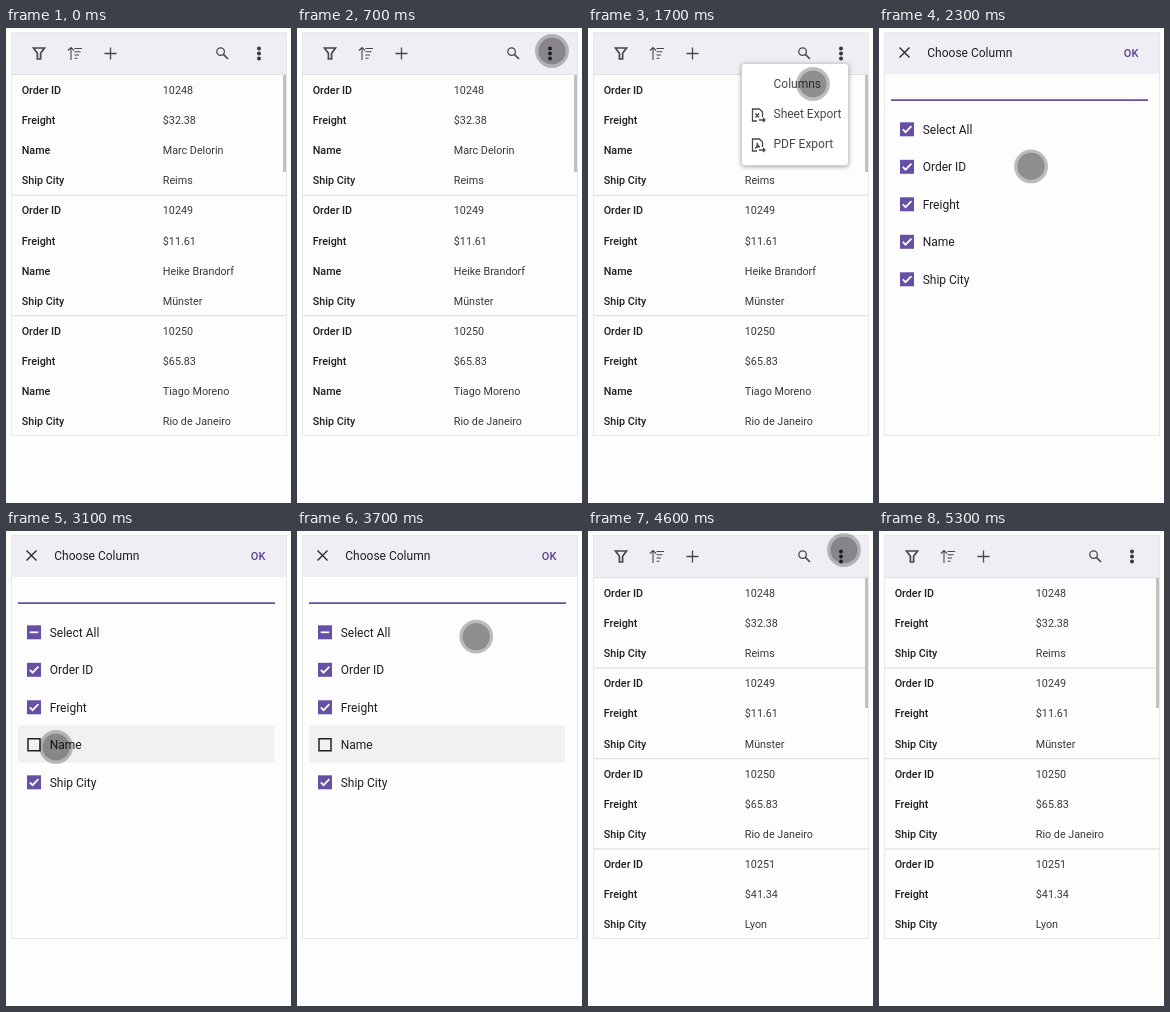
These frames come from a looping animation (285x475 px, 5.7 s). An HTML page:

```html
<!DOCTYPE html>
<html lang="en">
<head>
<meta charset="utf-8">
<title>Column chooser</title>
<style>
  html, body { margin: 0; width: 100%; height: 100%; overflow: hidden; background: #fefefe; }
  svg { display: block; width: 285px; height: 475px; font: 12px Roboto, sans-serif; fill: #1f1d23; }
  .cells { font-size: 10.75px; }
  .label { font-weight: 500; }
  .value { fill: #39363f; }
  .line { fill: none; stroke: #49454e; stroke-width: 1.3; }
  .menu { fill: #49454e; }
  .panel { fill: #fff; stroke: #d2d2d2; filter: drop-shadow(0 1px 2px #0005); }
  .tick { fill: none; stroke: #fff; stroke-width: 1.7; }
</style>
</head>
<body>
<svg viewBox="0 0 285 475">
  <rect x="5.5" y="4.5" width="275" height="403" fill="#fdfdfd" stroke="#e8e8e8"/>
  <path d="M6 5H280V46H6Z" fill="#f0eef5"/>

  <g id="grid">
    <path d="M6 46.5H280" stroke="#e0e0e0"/>
    <g class="line">
      <path d="M27.5 20H38.5L34.6 25.3V31H31.4V25.3Z" stroke-width="1.7"/>
      <path d="M65 32V19.5M62 22.5L65 19.5L68 22.5M68.5 20.5H76M68.5 23.8H74.5M68.5 27H73M68.5 30.3H71.5" stroke-width="1.1"/>
      <path d="M98.5 25.5H110.5M104.5 19.5V31.5"/>
      <circle cx="214.6" cy="23.6" r="3.8"/>
      <path d="M217.4 26.4L222 31" stroke-width="1.6"/>
    </g>
    <g fill="#3a363f">
      <circle cx="253" cy="20.5" r="2"/><circle cx="253" cy="25.5" r="2"/><circle cx="253" cy="30.5" r="2"/>
    </g>
    <g id="full" class="cells"></g>
    <g id="reduced" class="cells"></g>
  </g>

  <g id="menu" class="menu">
    <rect class="panel" x="153.5" y="35.5" width="107" height="102" rx="3"/>
    <text x="185.5" y="60">Columns</text>
    <text x="185.5" y="90">Sheet Export</text>
    <text x="185.5" y="120">PDF Export</text>
    <g class="line" stroke-width="1.1">
      <path id="file" d="M169 93H164.5V81H171.5L174.5 84V89M171 92H177M175 90L177 92L175 94"/>
      <path d="M167.5 85.5L171 89.5M171 85.5L167.5 89.5"/>
      <use href="#file" y="30"/>
      <path d="M167 120.5C169 119 169.5 117 169 115C169.5 117.5 170.5 118.5 172 119C170 118.5 168.5 119 167 120.5"/>
    </g>
  </g>

  <g id="dialog">
    <path d="M20.5 19.5L30.5 29.5M30.5 19.5L20.5 29.5" stroke="#222" stroke-width="1.3"/>
    <text x="48.3" y="29">Choose Column</text>
    <text x="244.8" y="29" class="label" font-size="11" fill="#56418f">OK</text>
    <path d="M12 72.2H269" stroke="#6750a4" stroke-width="1.8"/>
    <path id="hover" d="M12 194.5H268V231.5H12Z" fill="#f1f1f1"/>
    <g id="options"></g>
  </g>

  <g id="cursor">
    <circle r="13.6" fill="#000" fill-opacity=".44"/>
    <circle r="15.2" fill="none" stroke="#000" stroke-opacity=".26" stroke-width="3.4"/>
  </g>
</svg>
<script>
const LOOP = 5700, STEP = 100;
const $ = id => document.getElementById(id);
const show = (id, on) => $(id).style.display = on ? '' : 'none';

const records = [
  ['10248', '$32.38', 'Marc Delorin', 'Reims'],
  ['10249', '$11.61', 'Heike Brandorf', 'Münster'],
  ['10250', '$65.83', 'Tiago Moreno', 'Rio de Janeiro'],
  ['10251', '$41.34', 'Colette Varin', 'Lyon'],
];
const fields = ['Order ID', 'Freight', 'Name', 'Ship City'];

function cards(columns, count, thumb) {
  let out = '', row = 0;
  for (const record of records.slice(0, count)) {
    if (row) out += `<path d="M6 ${46.9 + row * 30.1}H280" stroke="#e2e2e2" stroke-width="1.3"/>`;
    for (const c of columns) {
      const y = Math.round(66 + row++ * 30.1);
      out += `<text class="label" x="15.7" y="${y}">${fields[c]}</text>
        <text class="value" x="156.8" y="${y}">${record[c]}</text>`;
    }
  }
  return out + `<rect x="277" y="47" width="3" height="${thumb}" fill="#c1c1c1"/>`;
}

function option(name, i) {
  const y = 101.3 + i * 37.5;
  const on = '<path d="M-7-7H7V7H-7Z" fill="#6750a4"/>';
  const tick = on + '<path class="tick" d="M-4.2 0L-1.4 2.9L4.4-3.1"/>';
  const changed = {
    'Select All': on + '<path class="tick" d="M-4.3 0H4.3"/>',
    'Name': '<path d="M-6-6H6V6H-6Z" fill="none" stroke="#222" stroke-width="1.5"/>',
  }[name];
  const box = changed ? `<g class="before">${tick}</g><g class="after">${changed}</g>` : tick;
  return `<g transform="translate(28 ${y})">${box}</g><text x="43.7" y="${y + 4.4}">${name}</text>`;
}

$('full').innerHTML = cards([0, 1, 2, 3], 3, 97);
$('reduced').innerHTML = cards([0, 1, 3], 4, 130);
$('options').innerHTML = ['Select All', ...fields].map(option).join('');

// start, end, target x, target y, ease-out power for x and y
const moves = [
  [100, 700, 255, 23, 2, 2],
  [900, 1700, 225, 56, 1.7, 2.1],
  [2200, 2900, 50, 216, 3.5, 4.7],
  [3400, 4200, 256, 19, 2.1, 1.75],
  [5100, 5300, 276, 23, 1, 1],
];

function cursorAt(t) {
  let x = 300, y = 45;
  for (const [start, end, tx, ty, px, py] of moves) {
    if (t <= start) break;
    const left = 1 - Math.min(1, (t - start) / (end - start));
    x = tx + (x - tx) * left ** px;
    y = ty + (y - ty) * left ** py;
  }
  return [x, y];
}

function frame() {
  const now = performance.now() % LOOP;
  const t = Math.floor(now / STEP) * STEP;
  const dialog = t >= 1900 && t < 4600, toggled = t >= 3100;
  show('grid', !dialog);
  show('full', t < 1900);
  show('reduced', t >= 4600);
  show('menu', t >= 900 && t < 1900);
  show('dialog', dialog);
  show('hover', toggled);
  document.querySelectorAll('.before').forEach(e => e.style.display = toggled ? 'none' : '');
  document.querySelectorAll('.after').forEach(e => e.style.display = toggled ? '' : 'none');
  show('cursor', t >= 200 && t < 5300);
  $('cursor').setAttribute('transform', `translate(${cursorAt(t)})`);
  requestAnimationFrame(frame);
}
frame();
</script>
</body>
</html>
```
